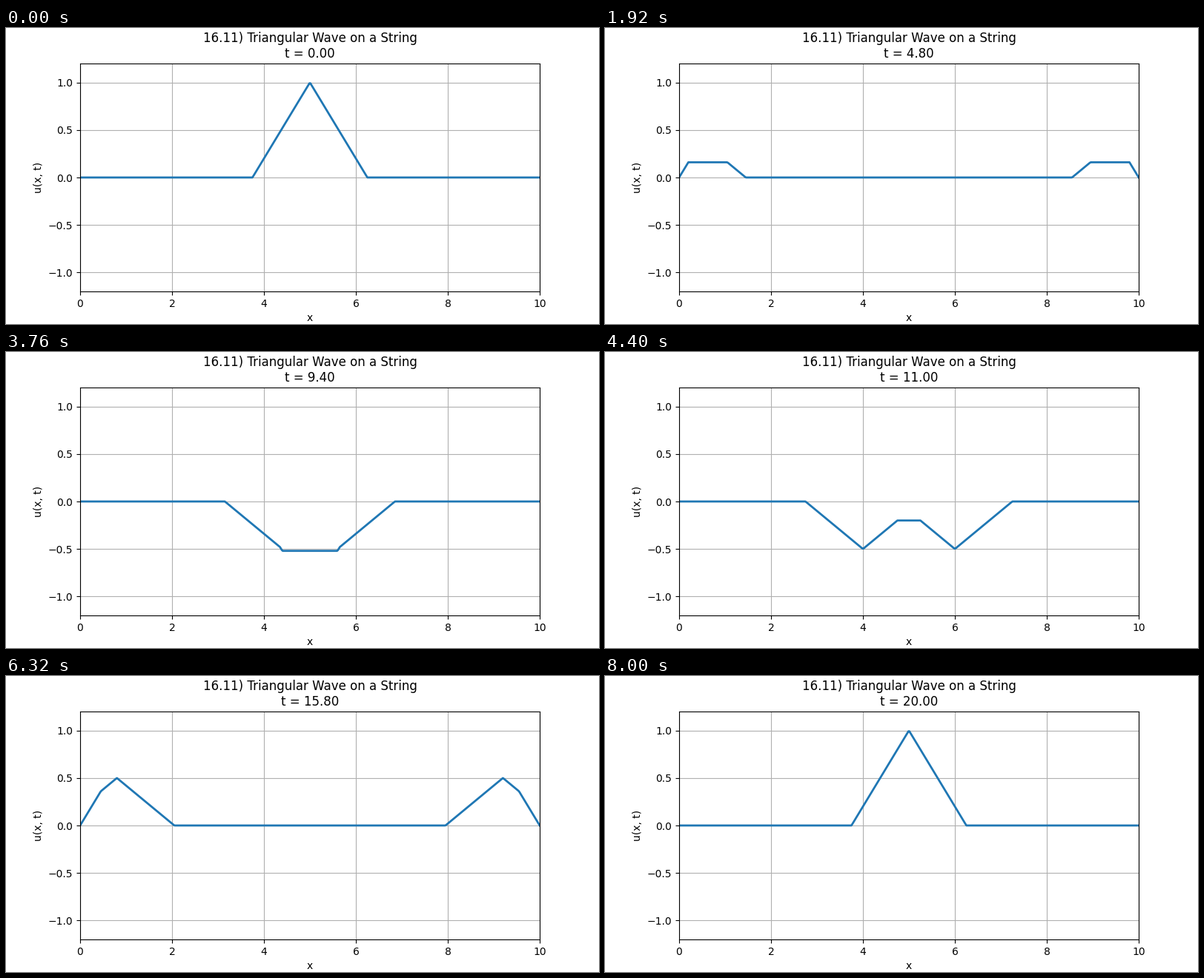
A matplotlib script that plays this animation: 800x400 px, repeating every 8080 ms.

```python
import numpy as np
import matplotlib.pyplot as plt
from matplotlib.animation import FuncAnimation

L = 10.0            # string length
SPEED = 1.0
HALF_WIDTH = L / 8  # half the base of the initial triangle
DT = 0.2
FRAMES = 101

x = np.linspace(0, L, 500)


def triangle(s):
    return np.maximum(0, 1 - np.abs(s - L / 2) / HALF_WIDTH)


def odd_extension(s):
    """Initial shape continued as an odd function of period 2L."""
    s = np.mod(s, 2 * L)
    return triangle(s) - triangle(2 * L - s)


def wave(t):
    shift = SPEED * t
    return (odd_extension(x - shift) + odd_extension(x + shift)) / 2


plt.rcParams["font.family"] = "DejaVu Sans"
fig, ax = plt.subplots(figsize=(8, 4), dpi=100)
line, = ax.plot(x, wave(0), lw=2, color="#1f77b4")
ax.set_xlim(0, L)
ax.set_ylim(-1.2, 1.2)
ax.set_xlabel("x")
ax.set_ylabel("u(x, t)")
ax.grid(True)


def update(i):
    t = i * DT
    line.set_ydata(wave(t))
    ax.set_title(f"16.11) Triangular Wave on a String\nt = {t:.2f}")
    return line,


anim = FuncAnimation(fig, update, frames=FRAMES, interval=80,
                     init_func=lambda: update(0), repeat=True,
                     repeat_delay=0, blit=False)
plt.show()
```
